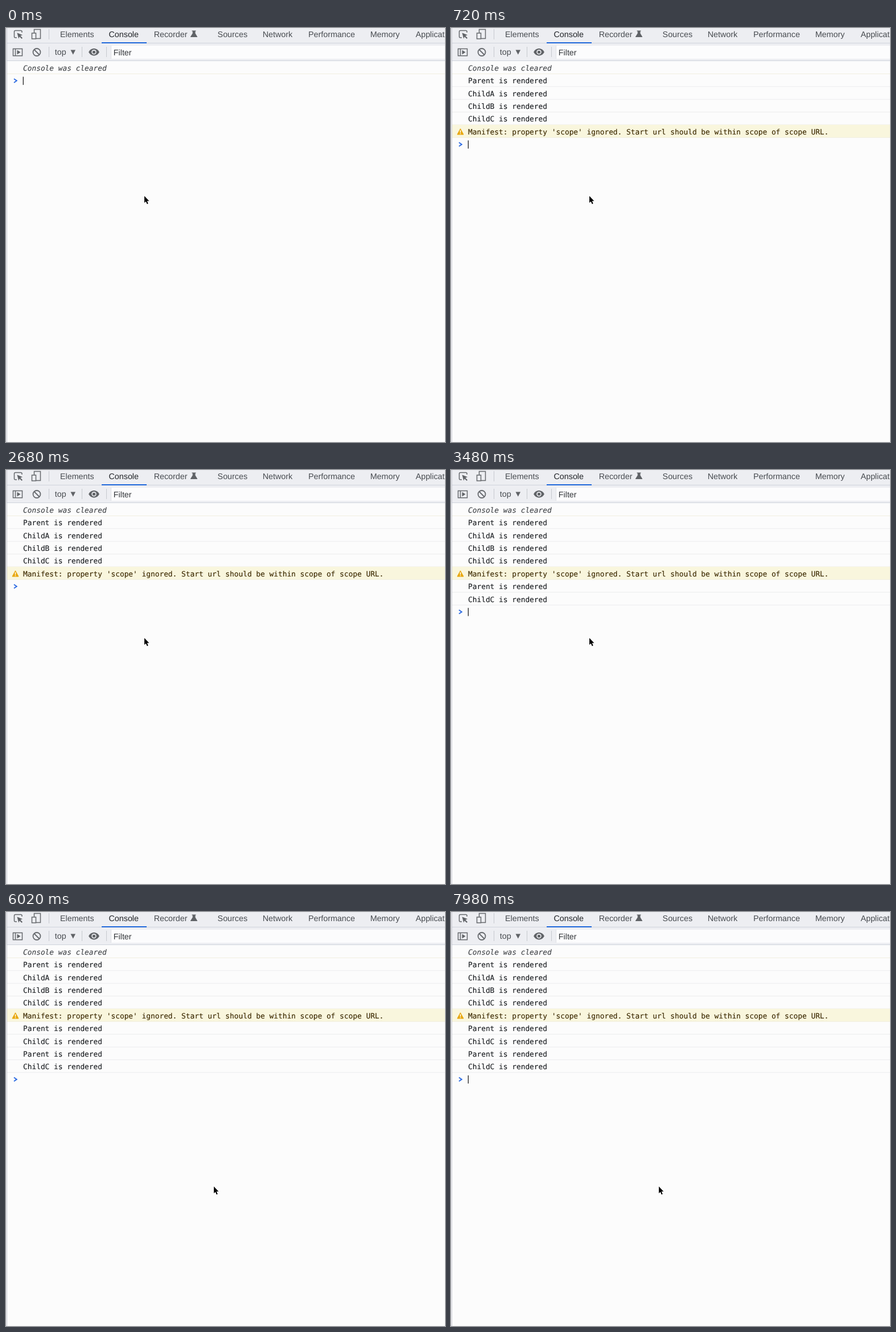
Recreate the animation shown at these times as an HTML page. Size 771x727 px, loop 8000 ms.

```html
<!DOCTYPE html>
<html lang="en">
<head>
<meta charset="utf-8">
<title>Console</title>
<style>
  html, body { margin: 0; width: 100%; height: 100%; overflow: hidden; background: #fcfcfc; }
  svg { display: block; width: 771px; height: 727px; }
  text { white-space: pre; text-rendering: geometricPrecision; fill: currentColor; }
  .ui { font: 14.3px "Liberation Sans", Arial, sans-serif; }
  .log { font: 12.83px "DejaVu Sans Mono", monospace; color: #1d2024; }
  .log text { stroke: currentColor; stroke-width: .15px; }
  .icon { fill: none; stroke: #66696d; stroke-width: 1.5; }
  .solid { fill: #606367; }
</style>
</head>
<body>
<svg viewBox="0 0 771 727">
  <rect width="771" height="727" fill="#fcfcfc"/>
  <rect width="771" height="58" fill="#edeef2"/>
  <path d="M2 26.500H771M2 57.500H771" stroke="#cfd3dc"/>
  <rect x="184" y="31" width="587" height="23" fill="#fcfcfd"/>
  <path d="M184.500 31V54" stroke="#dfe1e6"/>
  <rect x="168" y="25" width="79" height="2" fill="#1f67db"/>
  <path d="M75.500 2V20M75.500 33V51M133.500 33V51M176.500 33V51" stroke="#c6c9cf"/>

  <!-- inspect, device -->
  <path class="icon" d="M19 17H16.500Q14.500 17 14.500 15V6.500Q14.500 4.500 16.500 4.500H26Q28 4.500 28 6.500V8"/>
  <path class="solid" d="M19.500 8.500L29 12.300L25.300 13.800L29 17.600L27.500 19L23.800 15.300L22.200 18.700Z"/>
  <path class="icon" d="M49.500 8.500V2.500H60.500V18.500H53M45.500 9H52.500V19H45.500Z"/>
  <!-- sidebar, clear, eye -->
  <path class="icon" d="M12.500 36.500H28.500V48.800H12.500ZM16.500 36.500V48.800"/>
  <path class="solid" d="M19.500 38.800L25.500 42.600L19.500 46.500Z"/>
  <g class="icon" style="stroke-width:1.800"><circle cx="54" cy="42.500" r="6.500"/><path d="M49.500 38L58.500 47"/></g>
  <path class="solid" d="M113.500 38.500H122L117.800 46.800Z"/>
  <path class="solid" d="M145.300 42.300C148.500 34 160.500 34 163.700 42.300C160.500 50.600 148.500 50.600 145.300 42.300Z"/>
  <circle cx="154.500" cy="42.300" r="4.200" fill="#edeef2"/>
  <circle class="solid" cx="154.500" cy="42.300" r="2.600"/>
  <!-- flask -->
  <path class="solid" d="M326.500 4.500H333.500V5.800H332.500V9.500L336 15.300V16H324V15.300L327.700 9.500V5.800H326.500Z"/>

  <g id="labels" class="ui"></g>
  <g id="log" class="log"></g>
  <g id="prompt">
    <path d="M14 -3.400L18.800 0L14 3.400" fill="none" stroke="#2d6be2" stroke-width="1.900"/>
    <rect id="caret" x="29.700" y="-7" width="1.200" height="14.300" fill="#111"/>
  </g>
  <path d="M1.500 0V727" stroke="#c4c6cf"/>
  <path id="mouse" d="M0 0V12L2.700 9.500L4.800 14.200L6.700 13.300L4.700 8.800H8.400Z" stroke="#fff" stroke-width="1.400" paint-order="stroke"/>
</svg>
<script>
const LOOP = 8000, PITCH = 22.37, TOP = 70.2;
const $ = id => document.getElementById(id);

const labels = [
  ["Elements", 95, 16], ["Console", 180.5, 16, "#202327"], ["Recorder", 259.7, 16],
  ["Sources", 371.6, 16], ["Network", 450.8, 16], ["Performance", 531, 16],
  ["Memory", 639.7, 16], ["Application", 719.4, 16],
  ["top", 85.8, 47.3], ["Filter", 188.8, 47.8, "#33363a"]
];
$("labels").innerHTML = labels.map(([s, x, y, c = "#474b50"]) =>
  `<text x="${x}" y="${y}" color="${c}">${s}</text>`).join("");

// Console rows with the time at which each one appears
const warning = "Manifest: property 'scope' ignored. Start url should be within scope of scope URL.";
const rendered = (time, ...names) => names.map(n => ({ time, text: n + " is rendered" }));
const rows = [
  { time: 0, text: "Console was cleared", style: "font-style:italic;color:#45484c" },
  ...rendered(400, "Parent", "ChildA", "ChildB", "ChildC"),
  { time: 400, text: warning, style: "color:#3d2b04", warn: true },
  ...rendered(3200, "Parent", "ChildC"),
  ...rendered(5720, "Parent", "ChildC")
];
const alertMark = `<rect x="2" y="-12.300" width="769" height="22.400" fill="#f9f6dd"/>
  <path d="M16.500 -5.200L22 5H11Z" fill="#e8a70c" stroke="#e8a70c" stroke-linejoin="round"/>
  <path d="M16.500 -2.500V1.600M16.500 2.700V4.300" stroke="#fff" stroke-width="1.500"/>`;
$("log").innerHTML = rows.map((r, i) => `<g transform="translate(0 ${TOP + i * PITCH})">
  ${r.warn ? alertMark : ""}
  <path d="M2 10.300H771" stroke="${r.warn || i == 0 ? "#f1efdf" : "#ebecee"}"/>
  <text x="30" y="4.800" style="${r.style || ""}">${r.text}</text></g>`).join("");
const rowNodes = [...$("log").children];

// Pointer stops: time, x, y
const stops = [
  [0, 243, 295], [4320, 252, 308], [4340, 269, 331], [4360, 291, 361], [4460, 316, 395],
  [4480, 334, 426], [4500, 351, 457], [4600, 361, 475], [4620, 365, 482]
];
const BLINK = 1640, FIRST_OFF = 1540;

function draw(t) {
  const shown = rows.filter(r => t >= r.time).length;
  rowNodes.forEach((n, i) => n.style.display = i < shown ? "" : "none");
  $("prompt").setAttribute("transform", `translate(0 ${TOP + shown * PITCH})`);
  const off = Math.floor((t - FIRST_OFF) / BLINK) % 2 === 0;
  $("caret").style.display = off ? "none" : "";
  const [, x, y] = stops.findLast(s => t >= s[0]);
  $("mouse").setAttribute("transform", `translate(${x} ${y})`);
}

const start = performance.now();
function tick() {
  draw((performance.now() - start) % LOOP);
  requestAnimationFrame(tick);
}
tick();
</script>
</body>
</html>
```
